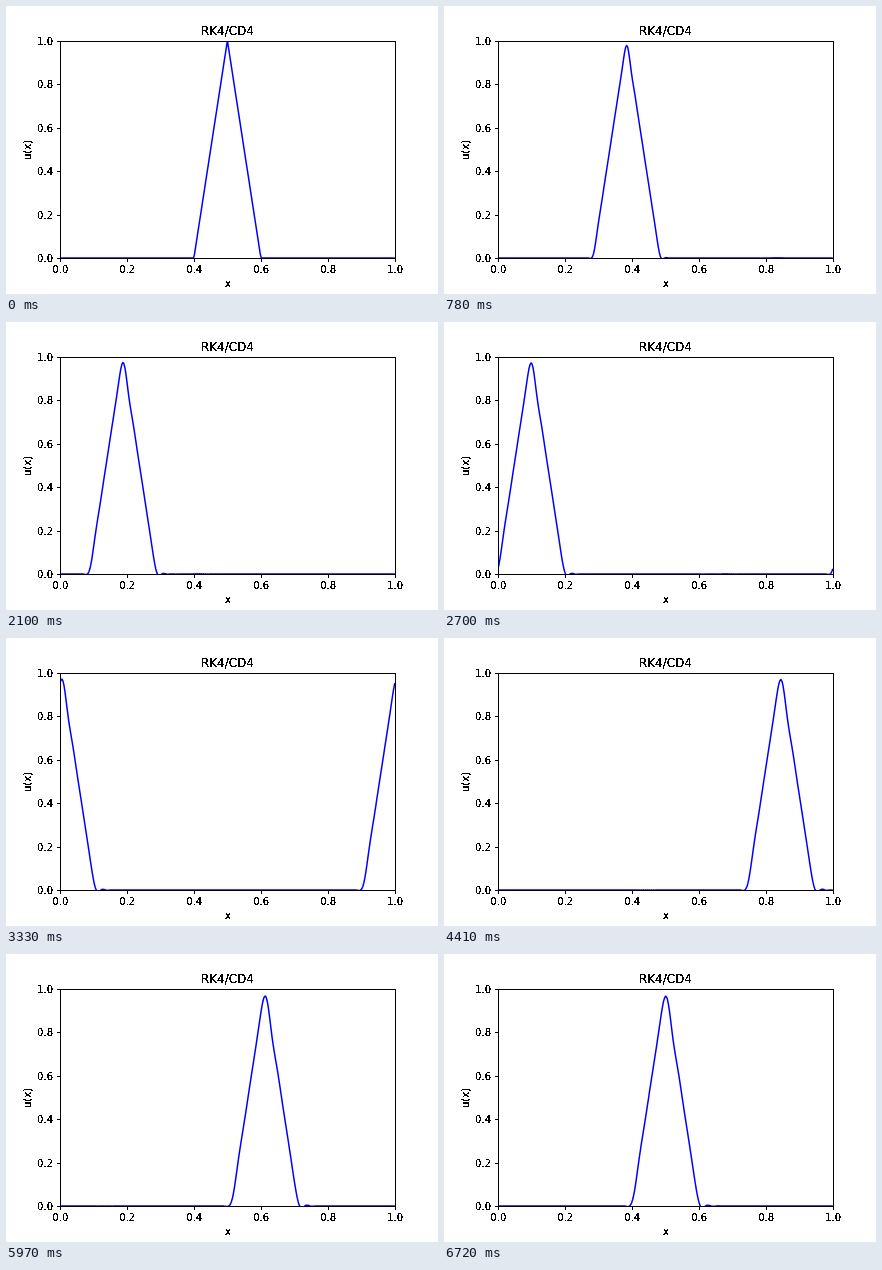
An HTML page with a canvas that plays this animation: 432 px wide and 288 px high, repeating every 6.75 s.

```html
<!DOCTYPE html>
<html lang="en">
<head>
<meta charset="utf-8">
<title>RK4/CD4</title>
<style>
  html, body { margin: 0; width: 100%; height: 100%; overflow: hidden; background: #fff; }
  canvas { display: block; }
</style>
</head>
<body>
<canvas id="plot" width="432" height="288"></canvas>
<script>
const W = 432, H = 288;
const LEFT = 54, RIGHT = 388.8, TOP = 34.56, BOTTOM = 252;
const STEPS = 224, FRAME_MS = 30;
const N = 336, DX = 1 / N, DT = 1 / STEPS;
const ctx = document.getElementById('plot').getContext('2d');

const px = x => LEFT + (RIGHT - LEFT) * x;
const py = u => BOTTOM - (BOTTOM - TOP) * u;
const snap = v => Math.floor(v + 0.5);

// Fourth-order compact derivative on a periodic grid. The (1, 4, 1) system
// is inverted with one forward and one backward recursive pass.
const P = 2 - Math.sqrt(3), WARM = 30;

function slope(u) {
  const d = new Float64Array(N);
  for (let i = 0; i < N; i++) {
    d[i] = 3 * P / DX * (u[(i + 1) % N] - u[(i + N - 1) % N]);
  }
  let y = 0;
  for (let i = N - WARM; i < N; i++) y = d[i] - P * y;
  for (let i = 0; i < N; i++) d[i] = y = d[i] - P * y;
  y = 0;
  for (let i = WARM - 1; i >= 0; i--) y = d[i] - P * y;
  for (let i = N - 1; i >= 0; i--) d[i] = y = d[i] - P * y;
  return d;
}

// One classic Runge-Kutta step of u_t = u_x
function step(u) {
  const ahead = (k, h) => u.map((v, i) => v + h * k[i]);
  const k1 = slope(u);
  const k2 = slope(ahead(k1, DT / 2));
  const k3 = slope(ahead(k2, DT / 2));
  const k4 = slope(ahead(k3, DT));
  return u.map((v, i) => v + DT / 6 * (k1[i] + 2 * k2[i] + 2 * k3[i] + k4[i]));
}

function solve() {
  const hat = Float64Array.from({ length: N }, (_, i) =>
    Math.max(0, 1 - 10 * Math.abs(i * DX - 0.5)));
  const states = [hat];
  for (let s = 0; s < STEPS; s++) states.push(step(states[s]));
  return states;
}

// Axes, ticks and labels on a transparent layer with hard-edged text
function makeAxes() {
  const layer = document.createElement('canvas');
  layer.width = W;
  layer.height = H;
  const g = layer.getContext('2d', { willReadFrequently: true });
  g.fillStyle = '#000';

  const text = (s, x, y, size, align) => {
    g.font = size + 'px "DejaVu Sans", sans-serif';
    g.textAlign = align;
    g.fillText(s, x, y);
  };

  text('RK4/CD4', 221.4, 29, 12, 'center');
  text('x', 221.9, 281, 10, 'center');
  g.save();
  g.translate(25, 144);
  g.rotate(-Math.PI / 2);
  text('u(x)', 0, 0, 10, 'center');
  g.restore();

  for (let i = 0; i <= 5; i++) {
    const label = (i / 5).toFixed(1);
    text(label, px(i / 5) + 0.3, 267, 10, 'center');
    text(label, 47, snap(py(i / 5)) + 4, 10, 'right');
  }

  const img = g.getImageData(0, 0, W, H);
  for (let i = 3; i < img.data.length; i += 4) {
    img.data[i] = img.data[i] > 84 ? 255 : 0;
  }
  g.putImageData(img, 0, 0);

  for (let i = 0; i <= 5; i++) {
    g.fillRect(snap(px(i / 5)), 253, 1, 3);
    g.fillRect(51, snap(py(i / 5)), 3, 1);
  }
  g.fillRect(54, 35, 336, 1);
  g.fillRect(54, 252, 336, 1);
  g.fillRect(54, 35, 1, 218);
  g.fillRect(389, 35, 1, 218);
  return layer;
}

const states = solve();
const axes = makeAxes();

function draw(n) {
  const u = states[n];
  ctx.fillStyle = '#fff';
  ctx.fillRect(0, 0, W, H);
  ctx.save();
  ctx.beginPath();
  ctx.rect(54, 35, 336, 218);
  ctx.clip();
  ctx.beginPath();
  for (let i = 0; i <= N; i++) ctx.lineTo(px(i * DX), py(u[i % N]));
  ctx.strokeStyle = '#00f';
  ctx.lineWidth = 1.5;
  ctx.lineJoin = 'round';
  ctx.stroke();
  ctx.restore();
  ctx.drawImage(axes, 0, 0);
}

const start = performance.now();

function tick() {
  const t = Math.max(0, performance.now() - start);
  draw(Math.floor(t / FRAME_MS) % states.length);
  requestAnimationFrame(tick);
}
tick();
</script>
</body>
</html>
```
